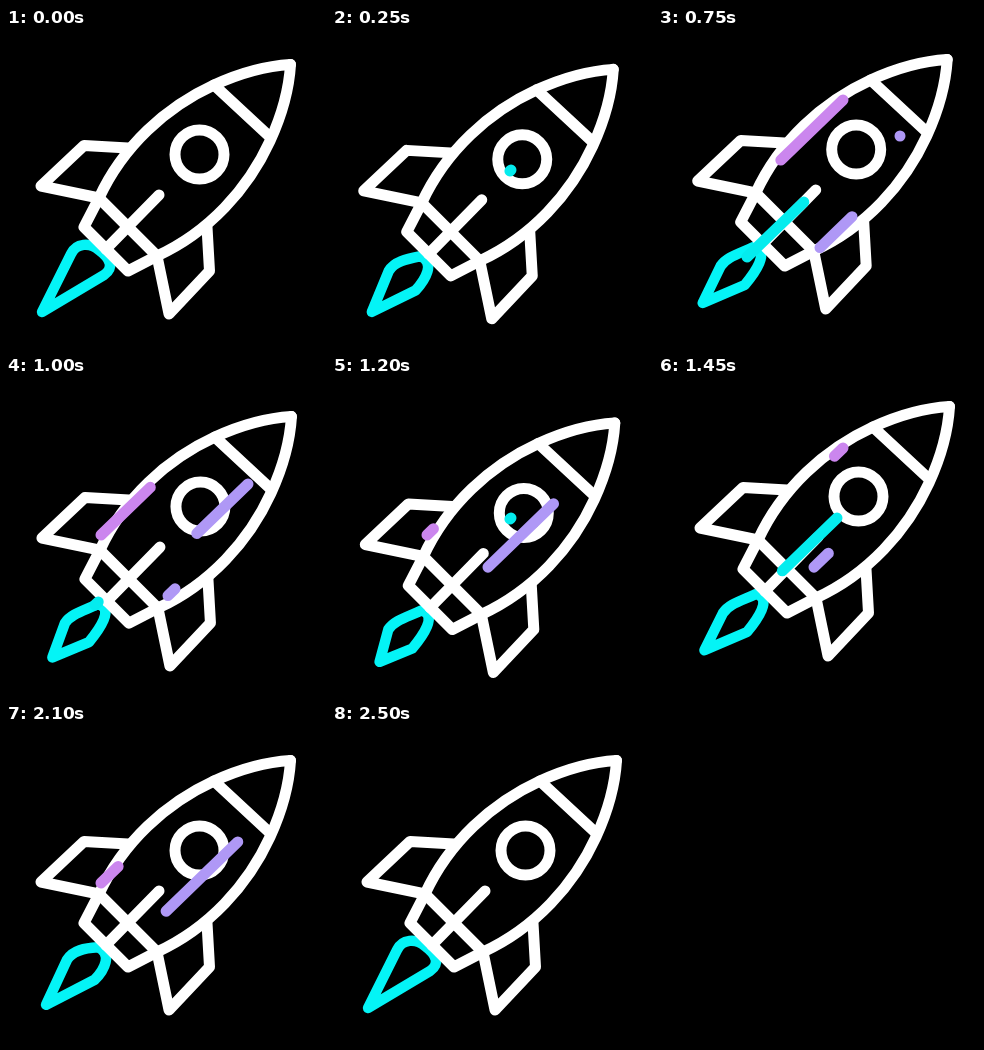
Recreate the animation shown at these times as an HTML page. Size 320x320 px, loop 2.55 s.

```html
<!DOCTYPE html>
<html lang="en">
<head>
<meta charset="utf-8">
<title>Rocket</title>
<style>
  html, body { margin: 0; width: 100%; height: 100%; overflow: hidden; background: #000; }
  svg { display: block; width: 100%; height: 100%; }
  svg * { fill: none; stroke-width: 11; stroke-linecap: round; stroke-linejoin: round; }
  #rocket { stroke: #fff; }
  #flame { stroke: #04f4f6; stroke-width: 10.5; }
</style>
</head>
<body>
<svg viewBox="0 0 320 320">
  <g id="rocket">
    <path id="flame"/>
    <g id="half">
      <path d="M284.5 36.5C259 38 232 46 208 57C160 79 117 118 93 170L78 199L100 221"/>
      <path d="M122 120L78 117.5L35 158L93 170"/>
    </g>
    <use href="#half" transform="matrix(0 -1 -1 0 321 321)"/>
    <path d="M208 57L264 109M93 170L151 228M153 167L100 221"/>
    <circle cx="193.5" cy="126.5" r="24.5"/>
  </g>
  <g id="streaks"></g>
</svg>
<script>
const LOOP = 2550, STEP = 50, CYCLE = 950;
const GROW = 420, LAG = 350, SLOPE = 0.967;
const $ = id => document.getElementById(id);
const clamp = k => Math.min(1, Math.max(0, k));
const mix = (a, b, k) => a.map((v, i) => v + (b[i] - v) * k);

// Turning points of the shake
const poses = [
  { t: 0, at: [0, 0] },
  { t: 350, at: [-4, 6] },
  { t: 500, at: [0.5, 11] },
  { t: 750, at: [4.7, -5] },
  { t: 1200, at: [-1.7, 10.5] },
  { t: 1450, at: [7, -6] },
  { t: 1700, at: [3, 5.3] },
  { t: 1850, at: [7, -6] },
  { t: 2100, at: [0, 0] },
  { t: LOOP, at: [0, 0] }
];

function shake(t) {
  const i = poses.findIndex(p => p.t > t);
  const a = poses[i - 1], b = poses[i];
  const k = (t - a.t) / (b.t - a.t);
  return mix(a.at, b.at, (1 - Math.cos(Math.PI * k)) / 2);
}

// Flame outline: tip, shoulder, then two curves back to the lower side
const wide = [36, 284, 65, 226, 70, 215, 84, 214, 93, 222, 105, 231, 108, 240, 98, 247];
const leaf = [43, 278.5, 58, 243, 64, 234, 76, 231, 91, 224, 108, 228, 92, 250, 82, 262];

// The leaf shortens as the rocket sinks
function flame(t, dy) {
  const thin = leaf.slice();
  thin[0] += 0.6 * dy;
  thin[1] -= 0.3 * dy;
  const p = mix(wide, thin, clamp(Math.min(t / 350, (2450 - t) / 600)));
  return `M${p.slice(0, 2)}L${p.slice(2, 4)}C${p.slice(4)}Z`;
}

const streaks = [
  { x: 185, y: 72, length: 90, color: '#cb86ee', start: 460, runs: 2 },
  { x: 242, y: 108, length: 86, color: '#af98f6', start: 750, runs: 2 },
  { x: 204, y: 179, length: 42, color: '#af98f6', start: 300, runs: 1 },
  { x: 179, y: 142, length: 90, color: '#04ecee', start: 245, runs: 2 }
];

for (const s of streaks) {
  s.el = document.createElementNS('http://www.w3.org/2000/svg', 'path');
  s.el.setAttribute('stroke', s.color);
  $('streaks').append(s.el);
}

// The head runs down the line, the tail follows after a pause
function streak(s, t) {
  const run = Math.floor((t - s.start) / CYCLE);
  const age = t - s.start - run * CYCLE;
  if (run < 0 || run >= s.runs || age > GROW + LAG) return '';
  const point = time => {
    const d = s.length * clamp(time / GROW);
    return [s.x - d, s.y + d * SLOPE];
  };
  return `M${point(age - LAG)}L${point(age)}`;
}

function draw(now) {
  const t = Math.floor((now % LOOP) / STEP) * STEP;
  const [dx, dy] = shake(t);
  $('rocket').setAttribute('transform', `translate(${dx} ${dy})`);
  $('flame').setAttribute('d', flame(t, dy));
  for (const s of streaks) s.el.setAttribute('d', streak(s, t));
}

const origin = performance.now();
function frame() {
  draw(performance.now() - origin);
  requestAnimationFrame(frame);
}
frame();
</script>
</body>
</html>
```
